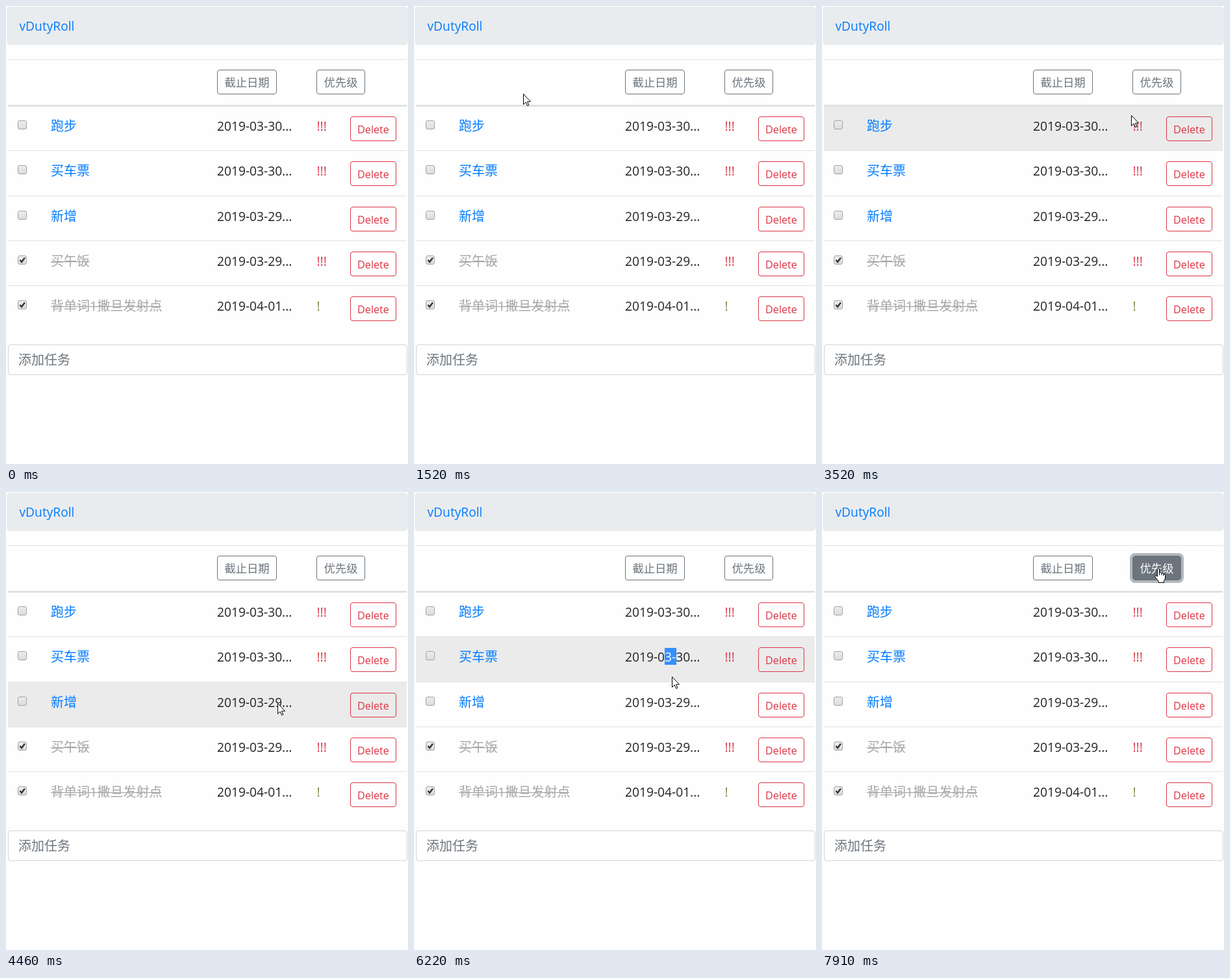
These frames come from a looping animation (619x705 px, 8 s). An HTML page:

```html
<!DOCTYPE html>
<html lang="zh">
<head>
<meta charset="utf-8">
<style>
html, body { margin: 0; width: 100%; height: 100%; overflow: hidden; background: #fefefe; }
svg { display: block; }
text { font: 19.2px "Open Sans", "Noto Sans CJK SC", "Noto Sans CJK", sans-serif; fill: #212529; }
.task { font-size: 20px; fill: #007bff; }
.done { fill: #a6a6a6; }
.high { fill: #dc3545; }
.low { fill: #7f8240; }
.hint { font-size: 20px; fill: #6c757d; }
.delete { font-size: 16.2px; fill: #dc3545; }
.sort { font-size: 17.3px; text-anchor: middle; }
.cursor { fill: #fff; stroke: #000; stroke-linejoin: round; }
</style>
</head>
<body>
<svg id="stage" width="619" height="705" viewBox="0 0 619 705"></svg>
<script>
const LOOP = 8000, START = 520, STEP = 77.05;
const ROW_TOP = 154, ROW_H = 69.3;

// step, x, y of the pointer tip
const PATH = [
  [0, 351, 449], [1, 352, 300], [2, 352, 205], [4, 362, 168], [7, 392, 138], [8, 392, 138],
  [9, 384, 138], [10, 280, 126], [11, 173, 110], [12, 173, 110], [13, 168, 135], [15, 120, 80],
  [16, 95, 45], [18, 62, 32], [19, 62, 32], [20, 75, 36], [22, 105, 90], [25, 151, 131],
  [28, 318, 136], [29, 413, 132], [30, 413, 132], [31, 394, 123], [32, 394, 123], [33, 408, 134],
  [34, 425, 146], [39, 476, 168], [43, 466, 190], [44, 466, 190], [45, 460, 200], [49, 425, 310],
  [51, 418, 325], [57, 409, 218], [61, 400, 315], [65, 392, 215], [67, 388, 218], [68, 387, 250],
  [70, 405, 256], [72, 403, 305], [74, 397, 284], [78, 398, 318], [81, 400, 256], [84, 425, 195],
  [88, 521, 114], [94, 521, 114], [95, 520, 116], [96, 518, 117]
];

const TASKS = [
  ['跑步', '2019-03-30', '!!!'],
  ['买车票', '2019-03-30', '!!!'],
  ['新增', '2019-03-29', ''],
  ['买午饭', '2019-03-29', '!!!', 60],
  ['背单词1撒旦发射点', '2019-04-01', '!', 170]
];

const TITLE = { x: 20, y: 18, w: 83, h: 26 };
const SORTS = [
  { x: 325, y: 98, w: 92, h: 38, label: '截止日期' },
  { x: 478, y: 98, w: 75, h: 38, label: '优先级' }
];

const box = (x, y, w, h, attrs) => `<rect x="${x}" y="${y}" width="${w}" height="${h}" ${attrs}/>`;
const label = (x, y, cls, str, attrs = '') => `<text x="${x}" y="${y}" class="${cls}" ${attrs}>${str}</text>`;
const outline = (x, y, w, h, color, attrs = 'fill="none"') =>
  box(x + .5, y + .5, w - 1, h - 1, `rx="3.5" stroke="${color}" ${attrs}`);

function taskRow([name, date, mark, strike], i) {
  const y = Math.round(ROW_TOP + i * ROW_H);
  return (i ? box(3, y - 1, 614, 1, 'fill="#dee2e6"') : '') +
    box(18.5, y + 22.5, 13, 13, 'rx="2.5" fill="url(#check)" stroke="#a3a3a3"') +
    (strike ? `<path d="M21.5 ${y + 29}l2.6 3 4.8-6.5" fill="none" stroke="#333" stroke-width="2.4"/>` : '') +
    label(69, y + 38, strike ? 'task done' : 'task', name) +
    (strike ? box(69, y + 31, strike, 1.2, 'fill="#a6a6a6"') : '') +
    label(325, y + 38, '', date + '...') +
    label(478.5, y + 38, mark.length > 1 ? 'high' : 'low', mark) +
    outline(530, y + 16, 71, 38, '#dc3545') +
    label(541, y + 42, 'delete', 'Delete');
}

const sortButton = (b, i) =>
  box(b.x - 2, b.y - 2, b.w + 4, b.h + 4, `id="ring${i}" rx="6" fill="none" stroke="#6c757d" stroke-opacity=".5" stroke-width="0"`) +
  outline(b.x, b.y, b.w, b.h, '#6c757d', `id="fill${i}" fill="#6c757d"`) +
  label(b.x + b.w / 2, 124, 'sort', b.label, `id="sort${i}"`);

const $ = id => document.getElementById(id);

$('stage').innerHTML = `
  <defs>
    <linearGradient id="check" x2="0" y2="1"><stop stop-color="#ededed"/><stop offset="1" stop-color="#dcdcdc"/></linearGradient>
    <clipPath id="clip">${box(386, 240, 18, 26, 'id="clipBox"')}</clipPath>
  </defs>` +
  box(1, 1, 618, 59, 'rx="5" fill="#e9ecef"') +
  label(20.5, 38, '', 'vDutyRoll', 'id="title"') +
  box(3, 82, 614, 1, 'fill="#dee2e6"') +
  box(3, 0, 614, 69, 'id="hover" fill="#ebebeb"') +
  box(3, 152, 614, 3, 'fill="#dee2e6"') +
  SORTS.map(sortButton).join('') +
  TASKS.map(taskRow).join('') +
  `<g id="selection" clip-path="url(#clip)">${box(386, 240, 19, 26, 'fill="#3390ff"')}
    ${label(325, 261, '', '2019-03-30...', 'style="fill:#fff"')}</g>` +
  outline(3, 521, 615, 47, '#ced4da', 'fill="#fff"') +
  label(19, 552, 'hint', '添加任务') +
  `<path id="arrow" class="cursor" d="M.5 .5V16.5L4.2 13.1 6.7 18.6 8.9 17.6 6.5 12.2H11.5Z"/>
  <g id="hand" class="cursor">
    <path d="M-1.5 12V2.2Q-1.5 .5 0 .5T1.5 2.2V7Q4 6 4.7 8Q7 7 7.7 9Q10.5 8.5 10.5 11.5V15Q10.5 18 8.5 20V22.5H0V20Q-3 17 -5.3 13Q-5.5 10 -1.5 13Z"/>
    <path d="M1.5 7V11M4.7 8V11M7.7 9V12" fill="none"/>
  </g>`;

function pointer(k) {
  const i = PATH.findIndex(p => p[0] >= k);
  if (i < 0) return PATH.at(-1).slice(1);
  const b = PATH[i], a = PATH[i - 1] || b;
  const f = a === b ? 0 : (k - a[0]) / (b[0] - a[0]);
  return [a[1] + (b[1] - a[1]) * f, a[2] + (b[2] - a[2]) * f];
}

function over(r, k) {
  if (k < 0) return false;
  const [x, y] = pointer(k);
  return x >= r.x && x < r.x + r.w && y >= r.y && y < r.y + r.h;
}

const show = (id, on) => $(id).setAttribute('visibility', on ? 'visible' : 'hidden');
const mix = (a, b, f) => Math.round(a + (b - a) * f);

function draw(now) {
  const k = Math.floor((now % LOOP - START) / STEP + .15);
  const [x, y] = pointer(k).map(Math.round);
  const onTitle = over(TITLE, k);
  const isHand = onTitle || SORTS.some(b => over(b, k));

  for (const id of ['arrow', 'hand']) {
    $(id).setAttribute('transform', `translate(${x} ${y})`);
    show(id, k >= 0 && (id === 'hand') === isHand);
  }

  const row = Math.floor((y - ROW_TOP) / ROW_H);
  show('hover', k > 0 && row >= 0 && row < TASKS.length);
  $('hover').setAttribute('y', Math.round(ROW_TOP + row * ROW_H));

  $('title').style.fill = onTitle ? '#0056b3' : '#007bff';
  $('title').style.textDecoration = onTitle ? 'underline' : 'none';

  SORTS.forEach((b, i) => {
    const level = (over(b, k) + over(b, k - 1)) / 2; // short colour fade
    $('fill' + i).setAttribute('fill-opacity', level);
    $('sort' + i).style.fill = `rgb(${[108, 117, 125].map(c => mix(c, 255, level))})`;
  });
  $('ring1').setAttribute('stroke-width', 4 * Math.min(1, Math.max(0, (k - 88) / 3)));

  show('selection', k >= 69 && k < 81);
  $('clipBox').setAttribute('width', k < 70 ? 11 : 18);
  requestAnimationFrame(draw);
}
requestAnimationFrame(draw);
</script>
</body>
</html>
```
